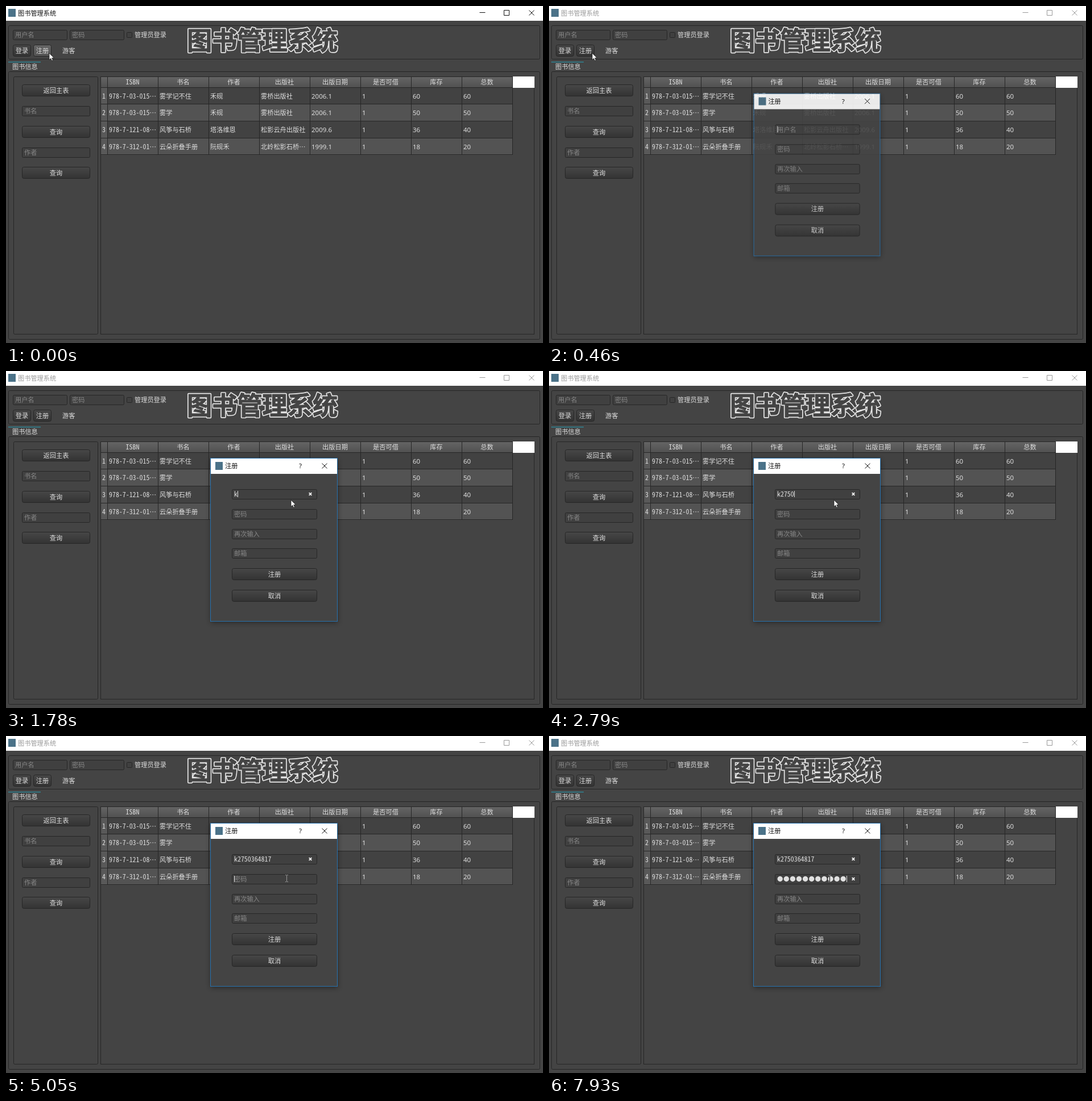
These frames come from a looping animation (944 by 593 pixels, 8 s). An HTML page:

```html
<!DOCTYPE html>
<html lang="zh-CN">
<head>
<meta charset="utf-8">
<title>图书管理系统</title>
<style>
html, body { margin: 0; width: 100%; height: 100%; overflow: hidden; background: #444; }
svg { display: block; width: 100vw; height: 100vh; }
text { font: 11.2px "Noto Sans CJK SC", "Noto Sans CJK", sans-serif; fill: #dedede; white-space: pre; }
.mono { font: 11.9px "Noto Sans Mono CJK SC", "Liberation Mono", monospace; }
.num { font: 11.5px "Noto Sans", "Noto Sans CJK SC", sans-serif; }
.hint { fill: #878787; }
.dark { fill: #111; }
.mid { text-anchor: middle; }
.banner { font-size: 44.2px; font-weight: 900; stroke-linejoin: round; }
</style>
</head>
<body>
<svg id="stage" viewBox="0 0 944 593" preserveAspectRatio="none">
  <defs>
    <linearGradient id="btn" x2="0" y2="1"><stop stop-color="#474747"/><stop offset="1" stop-color="#333"/></linearGradient>
    <linearGradient id="hover" x2="0" y2="1"><stop stop-color="#666"/><stop offset="1" stop-color="#535353"/></linearGradient>
    <linearGradient id="head" x2="0" y2="1"><stop stop-color="#646464"/><stop offset="1" stop-color="#505050"/></linearGradient>
    <filter id="blur" x="-20%" y="-20%" width="140%" height="140%"><feGaussianBlur stdDeviation="5"/></filter>
  </defs>
</svg>
<script>
const stage = document.getElementById('stage');
const LOOP = 8000, EDGE = '#262626';

function add(parent, tag, attrs = {}, text) {
  const node = document.createElementNS('http://www.w3.org/2000/svg', tag);
  for (const key in attrs) node.setAttribute(key, attrs[key]);
  if (text !== undefined) node.textContent = text;
  return parent.appendChild(node);
}
const set = (node, key, value) => node.setAttribute(key, value);
const show = (node, on) => set(node, 'opacity', +on);
const rect = (p, x, y, width, height, fill, more) => add(p, 'rect', { x, y, width, height, fill, ...more });
const box = (p, x, y, w, h, fill = 'none', r = 2) =>
  rect(p, x + .5, y + .5, w - 1, h - 1, fill, { rx: r, stroke: EDGE });
const line = (p, d, stroke, more) => add(p, 'path', { d, stroke, fill: 'none', ...more });
// y is the vertical middle of the text
const label = (p, x, y, text, cls = '') => add(p, 'text', { x, y: y + 4.2, class: cls }, text);

function button(p, x, y, w, h, text) {
  const face = box(p, x, y, w, h, 'url(#btn)', 3);
  label(p, x + w / 2, y + h / 2, text, 'mid');
  return face;
}
function input(p, x, y, w, h, hint) {
  box(p, x, y, w, h, '#404040');
  return label(p, x + 4, y + h / 2, hint, 'hint');
}
const appIcon = (p, x, y) => rect(p, x, y, 13, 14, '#4b7288');

// main window
rect(stage, 0, 0, 944, 593, '#444');
rect(stage, 0, 0, 944, 26, '#fff');
appIcon(stage, 4, 5);
const caption = label(stage, 21, 12.5, '图书管理系统', 'dark');
const winButtons = line(stage, 'M832.5 11.5h10M875.5 7.5h9v9h-9zM919.5 7.5l9 9m0-9l-9 9', '#111');

box(stage, 4, 34, 935, 60);
input(stage, 12, 42, 96, 18, '用户名');
input(stage, 112, 42, 96, 18, '密码');
box(stage, 212, 46, 10, 10, '#404040', 1);
label(stage, 226, 51, '管理员登录');
button(stage, 12, 68, 32, 21, '登录');
const register = button(stage, 48, 68, 32, 21, '注册');
label(stage, 99, 79, '游客');

const banner = (stroke, width) => add(stage, 'text',
  { x: 318, y: 77, class: 'banner', style: `fill:#444;stroke:${stroke};stroke-width:${width}` }, '图书管理系统');
banner('#e6e6e6', 4.4);
banner('#444', 1);

box(stage, 4, 115, 935, 472);
rect(stage, 4, 98, 57, 1.2, '#2c93a6');
label(stage, 11, 107, '图书信息');

box(stage, 13, 124, 149, 454);
button(stage, 28, 138, 120, 21, '返回主表');
input(stage, 28, 176, 120, 18, '书名');
button(stage, 28, 211, 120, 21, '查询');
input(stage, 28, 249, 120, 18, '作者');
button(stage, 28, 283, 120, 21, '查询');

// table
const colX = i => 178.5 + i * 89, rowY = i => 143.5 + i * 29.67;
box(stage, 166, 124, 763, 454, 'none', 0);
rect(stage, 167, 125, 724, 19, 'url(#head)');
['ISBN', '书名', '作者', '出版社', '出版日期', '是否可借', '库存', '总数'].forEach((name, i) =>
  label(stage, colX(i) + 44, 134, name, i ? 'mid' : 'mid mono'));
[
  ['978-7-03-015…', '雾学记不住', '禾砚', '雾桥出版社', '2006.1', '1', '60', '60'],
  ['978-7-03-015…', '雾学', '禾砚', '雾桥出版社', '2006.1', '1', '50', '50'],
  ['978-7-121-08…', '风筝与石桥', '塔洛维恩', '松影云舟出版社', '2009.6', '1', '36', '40'],
  ['978-7-312-01…', '云朵折叠手册', '阮砚禾', '北岭松影石桥…', '1999.1', '1', '18', '20'],
].forEach((cells, r) => {
  const y = rowY(r);
  rect(stage, 167, y, 12, 29.67, '#595959');
  rect(stage, 179, y, 712, 29.67, r % 2 ? '#535353' : '#424242');
  label(stage, 169, y + 15, r + 1, 'mono');
  cells.forEach((text, c) =>
    label(stage, colX(c) + 2.5, y + 15, text, c === 0 ? 'mono' : c > 3 ? 'num' : ''));
});
for (let r = 0; r < 5; r++) line(stage, `M167 ${Math.round(rowY(r)) - .5}H891`, EDGE);
for (let c = 0; c < 9; c++) line(stage, `M${colX(c)} 125V262`, EDGE);
rect(stage, 891, 124, 38, 20, '#fff');

// dialog
const dialog = add(stage, 'g');
rect(dialog, 360, 156, 223, 287, '#000', { opacity: .4, filter: 'url(#blur)' });
rect(dialog, 359.5, 153.5, 223, 287, '#444', { stroke: '#2773b0' });
rect(dialog, 360, 154, 222, 27, '#fff');
appIcon(dialog, 368, 160);
label(dialog, 385, 167, '注册', 'dark');
label(dialog, 517.5, 167, '?', 'dark mid num');
line(dialog, 'M555.5 162.5l9 9m0-9l-9 9', '#111');
const userHint = input(dialog, 397, 208, 150, 18, '用户名');
const passHint = input(dialog, 397, 243, 150, 18, '密码');
input(dialog, 397, 278, 150, 18, '再次输入');
input(dialog, 397, 312, 150, 18, '邮箱');
button(dialog, 397, 347, 150, 21, '注册');
button(dialog, 397, 385, 150, 21, '取消');

const userText = label(dialog, 401, 217, '', 'mono');
const dots = Array.from({ length: 11 }, () => add(dialog, 'circle', { cy: 251.5, r: 4.7, fill: '#e0e0e0' }));
const clearMark = y => line(dialog, `M532.7 ${y - 2.3}l4.6 4.6m0-4.6l-4.6 4.6`, '#f4f4f4', { 'stroke-width': 1.7 });
const userClear = clearMark(216.5), passClear = clearMark(251.5);
const caret = rect(dialog, 0, 0, 1, 11, '#e0e0e0');

// pointers
const arrow = add(stage, 'path', {
  d: 'M0 0V11.6L2.7 9.2L4.5 13.3L6.4 12.5L4.7 8.5H8.3Z', fill: '#fff', stroke: '#111', 'stroke-width': .7 });
const beam = line(stage, 'M-2.5 -6H-.5M.5 -6H2.5M0 -5.5V5.5M-2.5 6H-.5M.5 6H2.5', '#d8d8d8',
  { style: 'mix-blend-mode:difference' });

const NAME = 'k2750364817';
const OPEN = [150, 220, 300, 380, 460, 530];
const NAME_KEYS = [1630, 2320, 2410, 2560, 2790, 2970, 3110, 3260, 3430, 3590, 3810];
const PASS_KEYS = [6000, 6150, 6230, 6380, 6530, 6690, 6760, 7160, 7530, 7760, 7930];
const CARET_OFF = [[770, 1320], [4440, 4910], [5530, 6000]];
const FOCUS_PASS = 4980;
const PATH = [
  [0, 76, 83], [770, 150, 105], [850, 335, 168], [930, 455, 215], [1010, 507, 240],
  [1170, 506, 236], [1240, 503, 231], [1320, 501, 227],
  [4750, 500, 230], [4830, 498, 236], [4910, 496, 244], [4980, 494, 249], [5050, 494, 250],
];
const passed = (times, t) => times.filter(k => k <= t).length;
// a clear mark fades in over three steps
const fade = (t, start) => t < start ? 0 : t < start + 70 ? .35 : t < start + 150 ? .7 : 1;

function draw(t) {
  const opened = t >= OPEN[0];
  const step = opened ? OPEN[passed(OPEN, t) - 1] : 0;
  const rest = Math.pow(1 - Math.max(0, step - 150) / 380, 1.3);
  set(dialog, 'opacity', opened ? 1 - rest : 0);
  set(dialog, 'transform', `translate(471 297) scale(${1 - .045 * rest}) translate(-471 -297)`);
  caption.style.fill = opened ? '#999' : '#111';
  set(winButtons, 'stroke', opened ? '#999' : '#111');
  set(register, 'fill', opened ? 'url(#btn)' : 'url(#hover)');

  const typed = passed(NAME_KEYS, t), hidden = passed(PASS_KEYS, t);
  userText.textContent = NAME.slice(0, typed);
  show(userHint, !typed);
  show(passHint, !hidden);
  const shift = hidden > 10 ? -.6 : 0;
  dots.forEach((dot, i) => {
    set(dot, 'cx', 406.8 + shift + i * 11.1);
    show(dot, i < hidden);
  });
  set(userClear, 'opacity', fade(t, NAME_KEYS[0]));
  set(passClear, 'opacity', fade(t, PASS_KEYS[0]));

  const inPass = t >= FOCUS_PASS;
  set(caret, 'x', Math.round(inPass ? 401 + shift + hidden * 11.1 : 401 + typed * 5.95));
  set(caret, 'y', inPass ? 246 : 211);
  show(caret, !CARET_OFF.some(([a, b]) => t >= a && t < b));

  const [, x, y] = PATH[passed(PATH.map(p => p[0]), t) - 1];
  const overField = y > 242 && x > 397 && x < 547;
  set(arrow, 'transform', `translate(${x} ${y})`);
  set(beam, 'transform', `translate(${x - .5} ${y + .5})`);
  show(arrow, !overField);
  show(beam, overField);
}

const start = performance.now();
function tick() {
  draw((performance.now() - start) % LOOP);
  requestAnimationFrame(tick);
}
draw(0);
requestAnimationFrame(tick);
</script>
</body>
</html>
```
